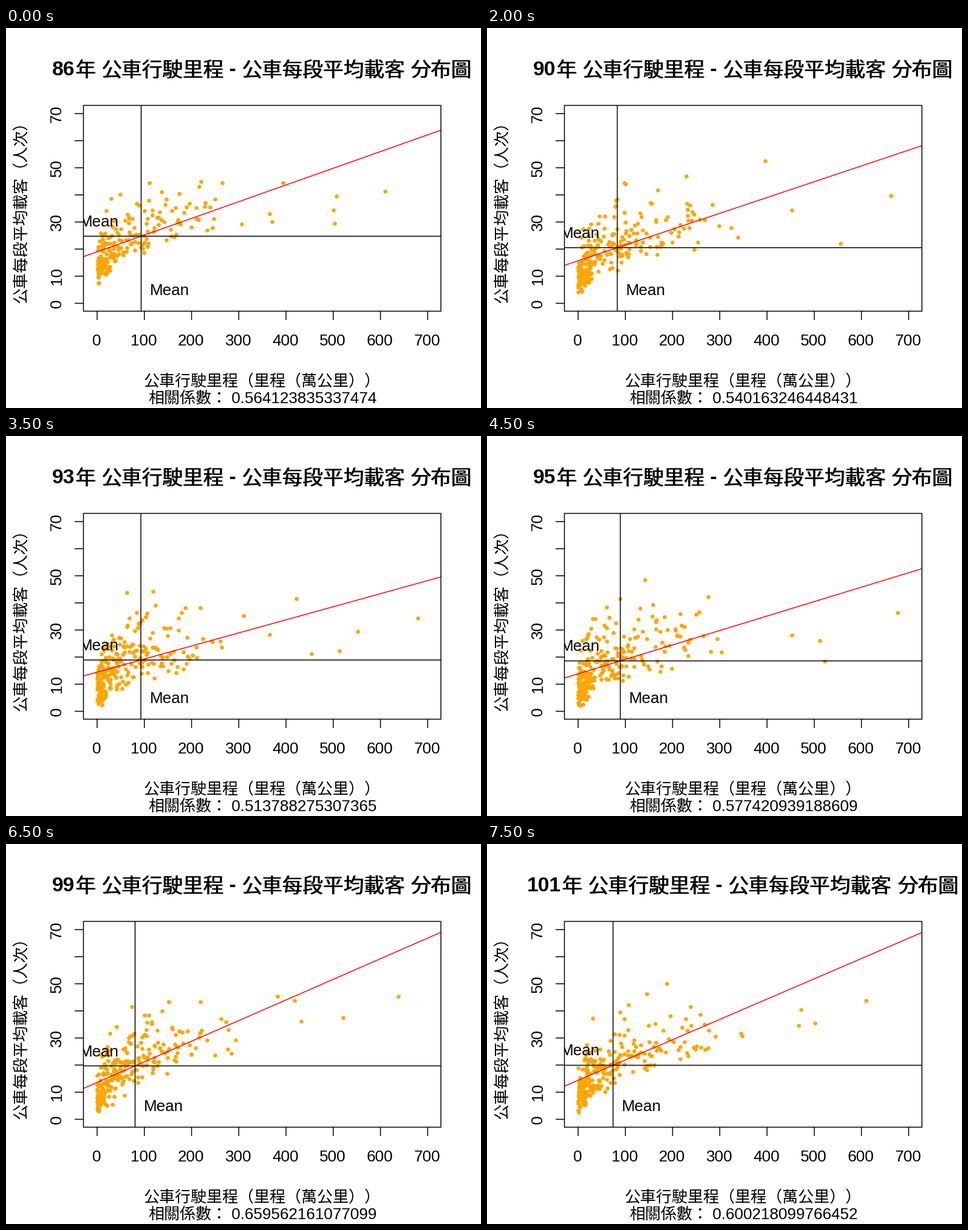
Recreate the animation shown at these times as a matplotlib script. Size 782 px wide and 626 px high, loop 8 s.

```python
from itertools import groupby

import numpy as np
import matplotlib.pyplot as plt
from matplotlib.animation import FuncAnimation
from matplotlib.patches import Rectangle

W, H = 782, 626
LEFT, TOP, RIGHT, BOTTOM = 127.5, 127.5, 716, 466.5
X0, Y0, SX, SY = 150, 453.5, 0.7775, 4.464
MID_X, MID_Y = 422, 297
YEARS = range(86, 102)

# Key years: mean mileage x, mean load y, slope (pixels), correlation
KEYS = [
    (86, 222.5, 343.0, 0.354, 0.564123835337474),
    (88, 212.5, 360.5, 0.419, 0.641518436660376),
    (91, 215.5, 362.5, 0.293, 0.489485651342459),
    (93, 222.0, 369.0, 0.277, 0.513788275307365),
    (95, 219.5, 370.5, 0.306, 0.577420939188609),
    (99, 212.5, 365.5, 0.437, 0.659562161077099),
    (101, 207.5, 364.5, 0.430, 0.600218099766452),
]

LATIN, CJK = "Liberation Sans", "Noto Sans CJK JP"

fig = plt.figure(figsize=(W / 72, H / 72), dpi=72, facecolor="white")
ax = fig.add_axes([0, 0, 1, 1])
ax.set_xlim(0, W)
ax.set_ylim(H, 0)
ax.axis("off")


def stats(year):
    years, *cols = zip(*KEYS)
    return [np.interp(year, years, col) for col in cols]


def is_cjk(ch):
    return ord(ch) > 0x2000


def em(ch):
    return 1 if is_cjk(ch) else {" ": .278, ".": .278, "-": .333}.get(ch, .556)


def label(x, y, s, size=26, font=LATIN, **kw):
    return ax.text(x, y, s, fontsize=size, family=font, color="black",
                   zorder=5, **kw)


def centred(s, y, size, drop, bold=False):
    """Centre mixed text; CJK runs sit `drop` pixels lower."""
    x = MID_X - size * sum(map(em, s)) / 2 - bold
    made = []
    for wide, run in groupby(s, is_cjk):
        run = "".join(run)
        if wide:
            # Bold CJK is smeared one pixel sideways
            for dx in range(1 + bold):
                made.append(label(x + dx, y + drop, run, size, CJK))
        else:
            made.append(label(x, y, run, size,
                              weight="bold" if bold else "normal"))
        x += size * sum(map(em, run))
    return made


def stroke(xs, ys, color="black"):
    return ax.plot(xs, ys, color=color, lw=1.5, zorder=3, snap=False,
                   solid_capstyle="butt")[0]


def cloud(year, mx, my, slope):
    """Skewed scatter around the fitted line, dense near zero mileage."""
    rng = np.random.default_rng(700 + year)
    n = int(np.interp(year, [86, 89], [200, 255]))
    near = int(n * 0.45)
    x = np.r_[rng.exponential(17, near), rng.gamma(2.2, 52, n - near),
              rng.uniform(380, 560, 3)]
    px = X0 + x * SX
    line = (Y0 - my + slope * (px - mx)) / SY
    mid = line + 5 - 11 * np.exp(-x / 40) - 0.7 * (x / 100) ** 2
    spread = 4.3 + 2.7 * (1 - np.exp(-x / 40))
    y = mid + spread * (rng.gamma(4, 1, len(x)) - 4) / 2
    y = np.where(y < 1, 1 + rng.uniform(0, 7, len(x)), y)

    # The busiest route stays well below the line
    bx = X0 + SX * (610 + 70 * np.sin(np.pi * (year - 86) / 15))
    by = Y0 - 0.73 * (Y0 - my + slope * (bx - mx))
    return np.r_[np.c_[px, Y0 - y * SY], [[bx, by]]]


# Fixed frame, ticks and captions
box = Rectangle((LEFT, TOP), RIGHT - LEFT, BOTTOM - TOP, fill=False,
                ec="black", lw=1.5, zorder=4, snap=False)
ax.add_patch(box)
for v in range(0, 701, 100):
    x = X0 + v * SX
    stroke([x, x], [BOTTOM, 481])
    label(x - 1, 523, str(v), ha="center")
for v in range(0, 71, 10):
    y = Y0 - v * SY
    stroke([113, LEFT], [y, y])
    if v in (0, 10, 30, 50, 70):
        label(91, y, str(v), ha="center", va="baseline", rotation=90,
              rotation_mode="anchor")
centred("公車行駛里程（里程（萬公里））", 588, 26, 2)
side = "公車每段平均載客（人次）"
label(32, MID_Y + 13 * len(side), side, font=CJK, rotation=90,
      rotation_mode="anchor", va="baseline")

# Parts that change each year
dots = ax.scatter([], [], s=6.6 ** 2, color="#ffa500", lw=0, zorder=2)
fit = stroke([], [], "red")
mean_v = stroke([], [])
mean_h = stroke([], [])
tag_v = label(0, 440, "Mean")
tag_h = label(121, 0, "Mean", clip_on=True)
tag_h.set_clip_path(box)
captions = []


def update(i):
    year = YEARS[i]
    mx, my, slope, corr = stats(year)
    dots.set_offsets(cloud(year, mx, my, slope))
    fit.set_data([LEFT, RIGHT], [my - slope * (x - mx) for x in (LEFT, RIGHT)])
    mean_v.set_data([mx, mx], [TOP, BOTTOM])
    mean_h.set_data([LEFT, RIGHT], [my, my])
    tag_v.set_x(mx + 14.5)
    tag_h.set_y(my - 16)
    while captions:
        captions.pop().remove()
    captions.extend(centred(
        f"{year}年 公車行駛里程 - 公車每段平均載客 分布圖", 78, 33.6, 2, True))
    captions.extend(centred(f"相關係數： {corr:.15f}", 618, 26, 1))
    return []


anim = FuncAnimation(fig, update, frames=len(YEARS), interval=500,
                     init_func=lambda: update(0), repeat=True, repeat_delay=0)
plt.show()
```
